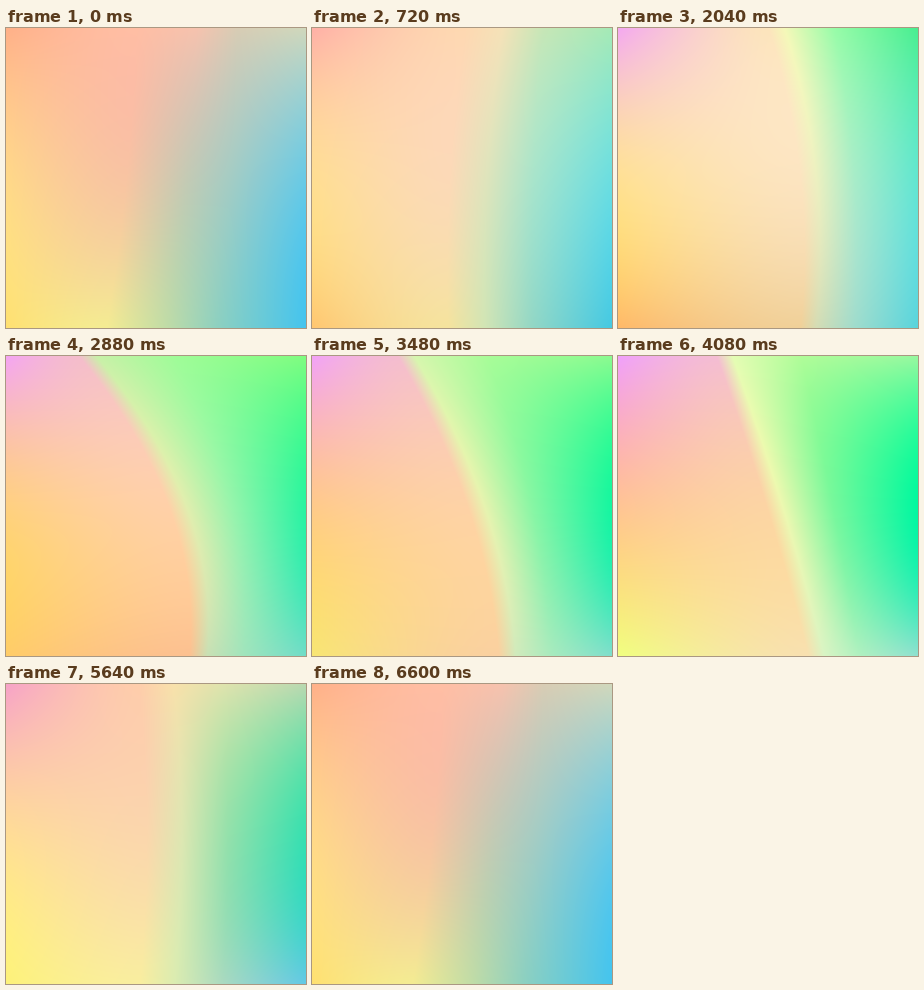
These frames come from a looping animation (300 px wide and 300 px high, 6720 ms). An HTML page with a canvas:

```html
<!DOCTYPE html>
<html lang="en">
<head>
<meta charset="utf-8">
<title>Drifting gradient</title>
<style>
html, body { margin: 0; width: 100%; height: 100%; overflow: hidden; }
canvas { display: block; width: 100vw; height: 100vh; }
</style>
</head>
<body>
<canvas id="view" width="300" height="300"></canvas>
<script>
const SIZE = 300, LOOP = 6720, STEP = 120, SETTLE = 6600;

// Each pose: start time, seam width, then top / middle / bottom:
// seam x and the colours left edge, seam left, seam right, inner right, right edge.
const poses = [
  [0, 60,
    '130 ffb088 ffbea4 f6c2ae d8ccb4 d0d8bc',
    '120 ffd888 f8c4a2 c4cab4 a4ccc4 68cae6',
    '100 ffe070 f4ec92 c0dca6 8cd0c0 44c4ee'],
  [1320, 18,
    '172 ffb0c0 fdeebc f4fcc0 b8fcb8 80f8b0',
    '152 ffe29a ffebc8 f4fac2 acf8d0 6ceedc',
    '165 ffb070 f6dca6 e0ecc0 98dcc8 44ccd8'],
  [2040, 16,
    '150 f4a8f0 fce4bc f4f8b8 98fca8 48ee90',
    '182 ffe094 fce4c0 ecf0c0 a8ecc8 60e6d0',
    '182 ffb868 f0d098 d4dcb4 a0dccc 58d4dc'],
  [2880, 18,
    '72 f4a4f4 f4bccc c8f0a8 a0fc98 80fc80',
    '162 ffd080 ffd0a8 e0eeae 98f4ac 28f4a0',
    '183 ffcc68 fcc090 c8e0b4 a0e4bc 70dcc8'],
  [4080, 16,
    '98 f0a0fc f4bcd4 e4fcb4 b0fc98 98f8a0',
    '148 ffc494 fcd4a4 ecf8b0 78f89c 00f8a0',
    '190 f0ff80 f8e0b0 d8f4c4 b0f0c0 90e0d0'],
  [4920, 16,
    '134 f098f8 fdd8b0 faf8a8 e4f4a8 a8d8a8',
    '156 ffe0a0 fde4b4 f0fcb0 88f098 10f088',
    '158 fcff80 fdf0a8 f0f8b8 c0e0c0 7ccce0']
].map(([time, width, ...rows]) => ({
  time,
  rows: rows.map(row => {
    const [seam, ...hues] = row.split(' ');
    const rgb = hues.flatMap(h => [0, 2, 4].map(i => parseInt(h.slice(i, i + 2), 16)));
    return [+seam, width, ...rgb];
  })
}));
poses.push({ time: SETTLE, rows: poses[0].rows });

const ctx = document.getElementById('view').getContext('2d');
const image = ctx.createImageData(SIZE, SIZE);
const mix = (a, b, k) => a + (b - a) * k;

function meshAt(t) {
  t = Math.min(t, SETTLE);
  let i = 0;
  while (i < poses.length - 2 && t >= poses[i + 1].time) i++;
  const from = poses[i], to = poses[i + 1];
  const k = (t - from.time) / (to.time - from.time);
  return from.rows.map((row, r) => row.map((v, n) => mix(v, to.rows[r][n], k)));
}

function draw(t) {
  const [top, mid, low] = meshAt(t);
  const px = image.data;
  for (let y = 0, p = 0; y < SIZE; y++) {
    // Quadratic through the three rows
    const v = (y + 0.5) / SIZE;
    const a = (1 - v) * (1 - 2 * v), b = 4 * v * (1 - v), c = v * (2 * v - 1);
    const [seam, width, ...rgb] = top.map((n, i) => n * a + mid[i] * b + low[i] * c);
    const right = seam + width;
    const stops = [0, seam, right, mix(right, SIZE, 0.37), SIZE];
    for (let x = 0, s = 0; x < SIZE; x++, p += 4) {
      while (s < 3 && x >= stops[s + 1]) s++;
      let u = (x - stops[s]) / (stops[s + 1] - stops[s]);
      if (s === 0) u = 1 - Math.pow(1 - u, 1.5);
      for (let ch = 0; ch < 3; ch++) {
        px[p + ch] = mix(rgb[s * 3 + ch], rgb[s * 3 + 3 + ch], u);
      }
      px[p + 3] = 255;
    }
  }
  ctx.putImageData(image, 0, 0);
}

const start = performance.now();
let shown = -1;
function tick() {
  const elapsed = (performance.now() - start) % LOOP;
  const t = Math.floor(elapsed / STEP) * STEP;
  if (t !== shown) draw(shown = t);
  requestAnimationFrame(tick);
}
tick();
</script>
</body>
</html>
```
